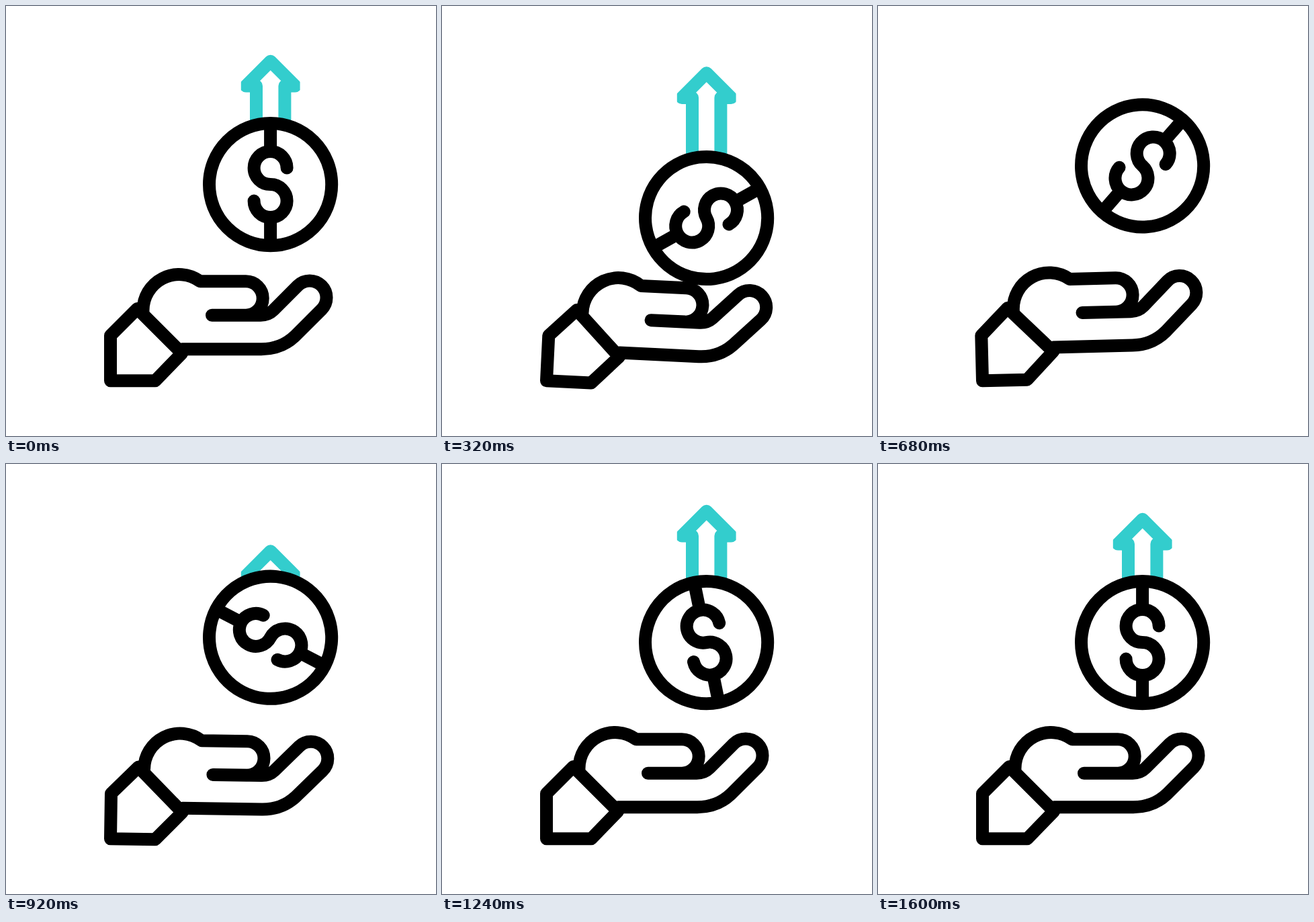
These frames come from a looping animation (640x640 px, 2.08 s). An HTML page:

```html
<!DOCTYPE html>
<html lang="en">
<head>
<meta charset="utf-8">
<title>Coin and hand</title>
<style>
  html, body { margin: 0; width: 100%; height: 100%; overflow: hidden; background: #fff; }
  svg { display: block; width: 100vw; height: 100vh; }
  path, circle { fill: none; stroke: #000; stroke-width: 19; stroke-linejoin: round; }
  .round { stroke-linecap: round; }
  #arrow path { stroke: #33cdcd; }
  #coin circle { fill: #fff; }
</style>
</head>
<body>
<svg viewBox="0 0 640 640">
  <defs>
    <clipPath id="sides"><rect x="349.8" y="0" width="87.8" height="640"/></clipPath>
  </defs>
  <g clip-path="url(#sides)">
    <g id="arrow">
      <path d="M372.5 230V119H357L393.7 82.3L430.4 119H414.9V230"/>
    </g>
  </g>
  <g id="coin">
    <circle r="91.1"/>
    <path d="M0 -91V-49M0 49V91"/>
    <path class="round" d="M24.5 -24.5A24.5 24.5 0 1 0 0 0A24.5 24.5 0 1 1 -24.5 24.5"/>
  </g>
  <g id="hand">
    <path d="M155.5 490.5L195.5 450.5L261.8 516.8L222 557.8H155.5Z"/>
    <path class="round" d="M204 454A53.5 53.5 0 0 1 289 409.8H357A25.2 25.2 0 0 1 357 460.2H306.5
      H379C386.5 460.2 393 457.5 397.9 452.7L434.3 416.3A25 25 0 0 1 469.7 451.7L430 491.4
      C416.7 504 399 510.7 380 510.7H262"/>
  </g>
</svg>
<script>
const LOOP = 2080, STEP = 40, MOVE_END = 1600, SPIN_TIME = 1520;

// [time in ms, value]
const coinDrop  = [[0, 0], [340, 50.4], [640, -28.4], [1060, 0]];
const arrowDrop = [[200, 0], [640, 96], [1240, -12], [1600, 0]];
const handTilt  = [[200, 0], [360, 3.3], [560, -3.2], [840, 1.3], [1040, 0]];

const smooth = u => u * u * (3 - 2 * u);

function track(keys, t) {
  if (t <= keys[0][0]) return keys[0][1];
  for (let i = 1; i < keys.length; i++) {
    const [t0, a] = keys[i - 1], [t1, b] = keys[i];
    if (t < t1) return a + (b - a) * smooth((t - t0) / (t1 - t0));
  }
  return keys[keys.length - 1][1];
}

// cubic-bezier(.32, 0, .37, 1)
function spinEase(x) {
  if (x >= 1) return 1;
  let lo = 0, hi = 1;
  for (let i = 0; i < 24; i++) {
    const s = (lo + hi) / 2, r = 1 - s;
    const at = 0.96 * r * r * s + 1.11 * r * s * s + s * s * s;
    if (at < x) lo = s; else hi = s;
  }
  return smooth(lo);
}

const [arrow, coin, hand] = ["arrow", "coin", "hand"].map(id => document.getElementById(id));
const place = (el, value) => el.setAttribute("transform", value);

function draw(ms) {
  const t = Math.min(Math.floor((ms % LOOP) / STEP) * STEP, MOVE_END);
  const spin = 360 * spinEase(t / SPIN_TIME);
  place(arrow, `translate(0 ${track(arrowDrop, t)})`);
  place(coin, `translate(393.6 ${265.6 + track(coinDrop, t)}) rotate(${spin})`);
  place(hand, `rotate(${track(handTilt, t)} 155.5 558)`);
}

let start = null;
function tick(now) {
  if (start === null) start = now;
  draw(now - start);
  requestAnimationFrame(tick);
}
draw(0);
requestAnimationFrame(tick);
</script>
</body>
</html>
```
